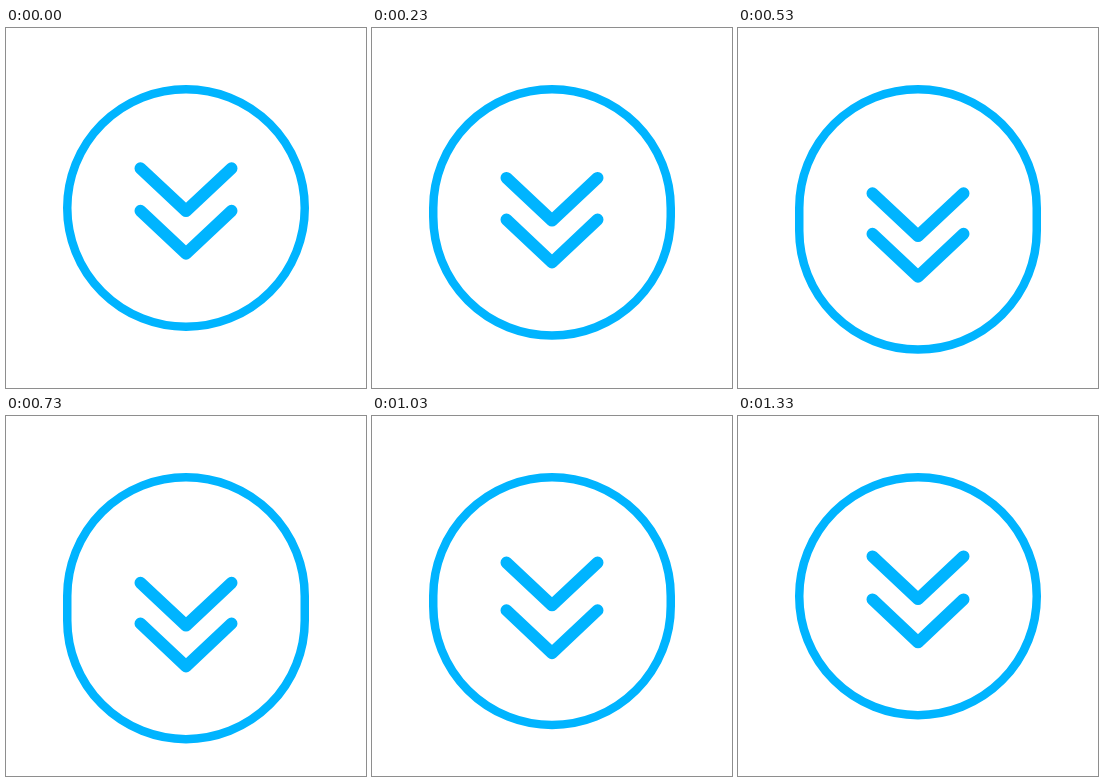
An HTML page for the animation above (1410 ms loop, 360 px wide and 360 px high).

```html
<!DOCTYPE html>
<html lang="en">
<head>
<meta charset="utf-8">
<title>Scroll down</title>
<style>
  html, body { margin: 0; width: 100%; height: 100%; overflow: hidden; background: #fff; }
  svg { display: block; width: 100vw; height: 100vh; }
</style>
</head>
<body>
<svg viewBox="0 0 360 360" fill="none" stroke="#00b4ff" stroke-linecap="round" stroke-linejoin="round">
  <rect id="ring" x="61.25" y="61.25" width="237.5" height="237.5" rx="118.75" stroke-width="8.5"/>
  <path id="upper" d="M134.5 140.3 L180 183 L225.5 140.3" stroke-width="12"/>
  <path id="lower" d="M134.5 182.8 L180 225.7 L225.5 182.8" stroke-width="12"/>
</svg>
<script>
const LOOP = 1410, STEPS = 28, SIZE = 237.5;
const [ring, upper, lower] = ['ring', 'upper', 'lower'].map(id => document.getElementById(id));

// Stretch and drop distances at a few steps of the loop
const keys = [0, 5, 11, 13.5, 15, 19, 23, 27, 28];
const tracks = {
  ring:  [0, 8.8, 22.8, 24.8, 24.4, 16.2, 5, 0.4, 0],
  upper: [0, 9.6, 25, 27, 26.5, 13, 1.9, 0.1, 0],
  lower: [0, 8.8, 23, 25, 24.7, 17.3, 6, 0.6, 0]
};

// Monotone cubic curve: flat at the turning points, no overshoot
function curve(ys) {
  const last = keys.length - 1;
  const slope = i => (ys[i + 1] - ys[i]) / (keys[i + 1] - keys[i]);
  const tangent = i => {
    if (i === 0 || i === last) return 0;
    const a = slope(i - 1), b = slope(i);
    return a * b <= 0 ? 0 : 2 * a * b / (a + b);
  };
  return k => {
    let i = 0;
    while (i < last - 1 && k >= keys[i + 1]) i++;
    const h = keys[i + 1] - keys[i], u = (k - keys[i]) / h, v = 1 - u;
    return v * v * (1 + 2 * u) * ys[i] + u * u * (3 - 2 * u) * ys[i + 1]
      + h * u * v * (v * tangent(i) - u * tangent(i + 1));
  };
}

const stretch = curve(tracks.ring);
const dropUpper = curve(tracks.upper);
const dropLower = curve(tracks.lower);

// Steps alternate between 30 and 70 ms
function stepAt(t) {
  const k = 2 * Math.floor(t / 100) + (t % 100 >= 30 ? 1 : 0);
  return Math.min(k, STEPS - 1);
}

function draw(t) {
  const k = stepAt(t % LOOP);
  ring.setAttribute('height', SIZE + stretch(k));
  upper.setAttribute('transform', `translate(0 ${dropUpper(k)})`);
  lower.setAttribute('transform', `translate(0 ${dropLower(k)})`);
}

const start = performance.now();
function tick() {
  draw(performance.now() - start);
  requestAnimationFrame(tick);
}
tick();
</script>
</body>
</html>
```
